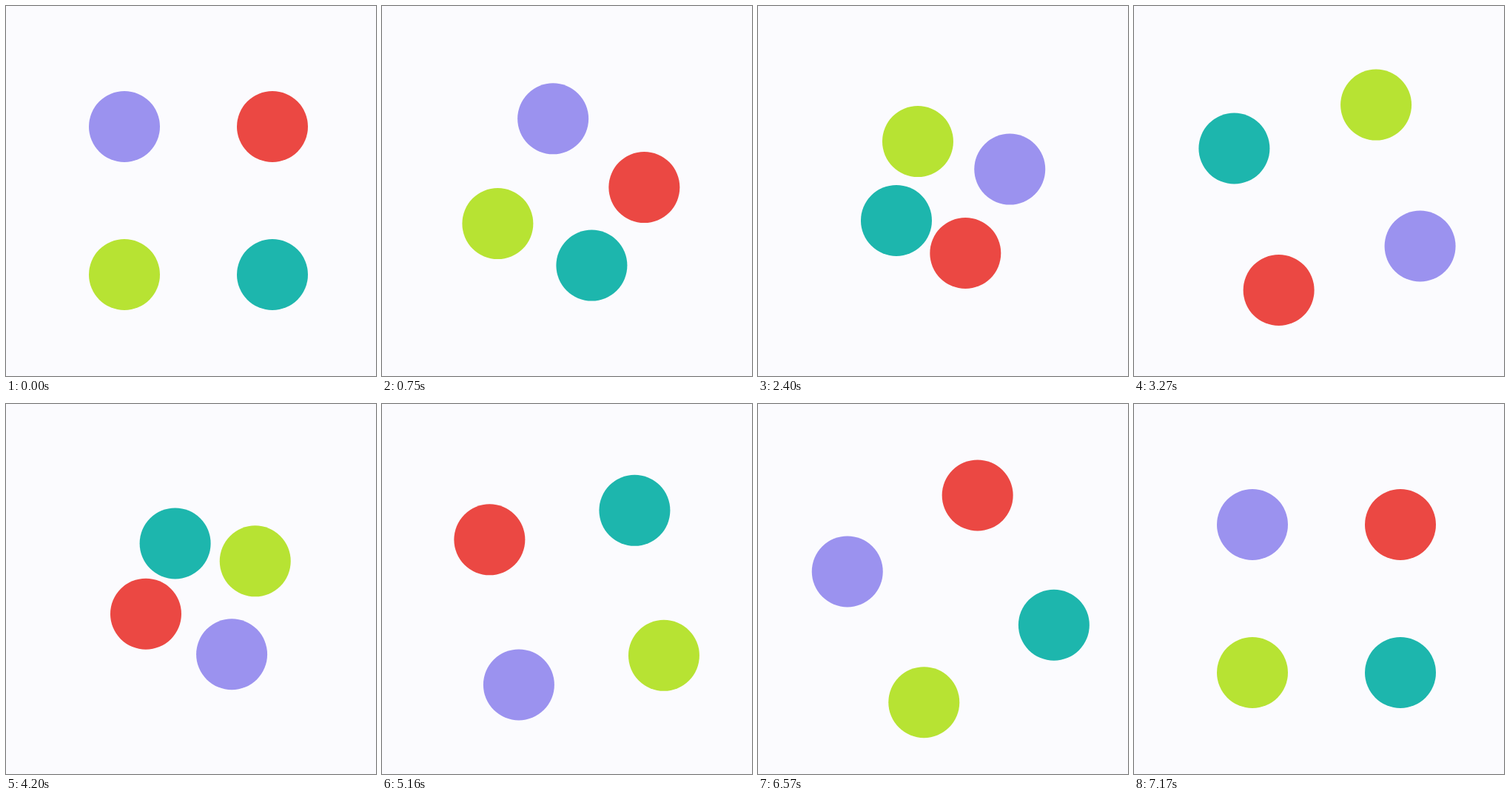
Recreate the animation shown at these times as an HTML page. Size 500 by 500 pixels, loop 7200 ms.

```html
<!DOCTYPE html>
<html lang="en">
<head>
<meta charset="utf-8">
<title>Four orbiting dots</title>
<style>
  html, body { margin: 0; width: 100%; height: 100%; overflow: hidden; background: #fbfbfe; }
  svg { display: block; width: 100vw; height: 100vh; }
</style>
</head>
<body>
<svg viewBox="0 0 500 500"></svg>
<script>
const LOOP = 7200, STEP = 30;          // ms
const PULSE = 60, GATHER = 15, RELEASE = 17, SETTLE = 13, STAGGER = 4 / 3; // steps
const PIVOT = 261, RADIUS = 48, REBOUND = 0.06;

// A nearly steady turn: [step, degrees]
const spin = [[0, 0], [50, 70.7], [80, 120.5], [140, 207.8], [172, 258.6], [200, 300], [239, 360]];

// In order of release. home: place around the pivot; pull: inward shift when gathered.
const dots = [
  { color: '#9b92ef', home: [-101, -98], pull: [30.2, 58.4] },
  { color: '#b7e333', home: [-101, 102], pull: [60.7, -25.3] },
  { color: '#eb4843', home: [99, -98], pull: [-46.7, 45.1] },
  { color: '#1db6ad', home: [99, 102], pull: [-36.5, -52.9] }
];

const clamp = u => Math.min(1, Math.max(0, u));
const smooth = u => u * u * (3 - 2 * u);

function turn(step) {
  const next = spin.findIndex(([at], i) => i > 0 && step <= at);
  const [s0, a0] = spin[next - 1], [s1, a1] = spin[next];
  return (a0 + (a1 - a0) * (step - s0) / (s1 - s0)) * Math.PI / 180;
}

// Gather quickly, spring back out, swing slightly past home, settle.
function squeeze(step, order) {
  const start = GATHER + 1 + order * STAGGER;
  const gathered = Math.sin(clamp(step / GATHER) * Math.PI / 2);
  const released = smooth(clamp((step - start) / RELEASE));
  const swing = Math.sin(clamp((step - start - RELEASE) / SETTLE) * Math.PI);
  return gathered - released - REBOUND * swing;
}

const svg = document.querySelector('svg');
for (const dot of dots) {
  dot.node = document.createElementNS('http://www.w3.org/2000/svg', 'circle');
  dot.node.setAttribute('r', RADIUS);
  dot.node.setAttribute('fill', dot.color);
  svg.append(dot.node);
}

function draw(ms) {
  const step = Math.floor(ms % LOOP / STEP);
  const angle = turn(step), cos = Math.cos(angle), sin = Math.sin(angle);
  dots.forEach(({ node, home, pull }, order) => {
    const s = squeeze(step % PULSE, order);
    const x = home[0] + pull[0] * s, y = home[1] + pull[1] * s;
    node.setAttribute('cx', PIVOT + x * cos - y * sin);
    node.setAttribute('cy', PIVOT + x * sin + y * cos);
  });
}

const start = performance.now();
function tick() {
  draw(performance.now() - start);
  requestAnimationFrame(tick);
}
draw(0);
requestAnimationFrame(tick);
</script>
</body>
</html>
```
